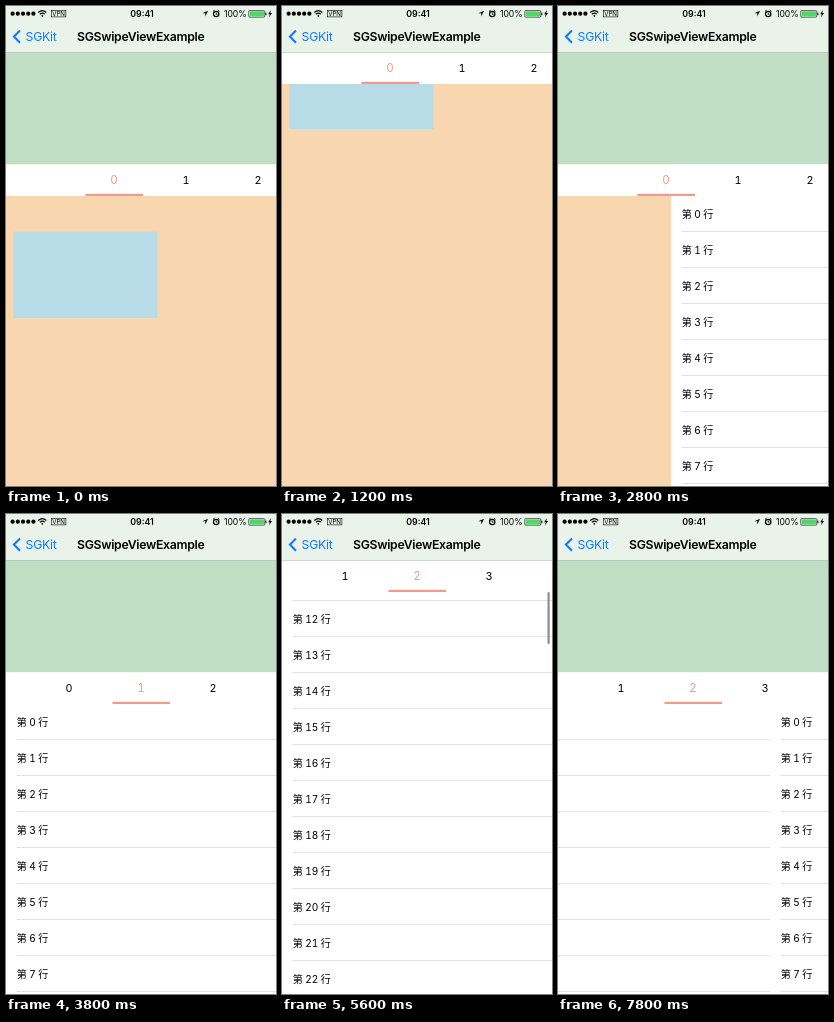
An HTML page that plays this animation: 270x480 px, repeating every 8 s.

```html
<!DOCTYPE html>
<html lang="zh">
<head>
<meta charset="utf-8">
<title>Swipe view</title>
<style>
  html, body { margin: 0; width: 100%; height: 100%; overflow: hidden; background: #fff; }
  svg { display: block; width: 100%; height: 100%; }
  text { font-family: Inter, "Noto Sans CJK SC", "Noto Sans CJK", sans-serif; }
  .row { font-size: 10.08px; letter-spacing: -.14px; font-variant-numeric: tabular-nums; }
  .tab { font-size: 10.8px; text-anchor: middle; font-variant-numeric: tabular-nums; }
  .tab.selected { font-size: 11.6px; fill: #f29b86; }
  .title { font-size: 12.24px; letter-spacing: -.29px; }
</style>
</head>
<body>
<svg viewBox="0 0 270 480" preserveAspectRatio="none">
  <g id="pages">
    <g id="page0">
      <rect width="270" height="480" fill="#f8d7b0"/>
      <rect id="box" x="7.5" width="144" height="86.4" fill="#b8dce7"/>
    </g>
  </g>
  <rect id="scroller" x="265.5" width="2.2" height="52" rx="1.1" fill="#8e8e8e"/>
  <g id="header">
    <rect y="46" width="270" height="112.4" fill="#c0dec3"/>
    <rect y="158.4" width="270" height="31.6" fill="#fff"/>
    <g id="tabs"><rect id="marker" x="-28.6" y="187.8" width="57.6" height="2.2" fill="#f29b8c"/></g>
  </g>

  <rect width="270" height="46" fill="#e9f3e9"/>
  <rect y="46" width="270" height=".6" fill="#b4c3b5"/>
  <path d="M14 24.5 8 30.6 14 36.7" fill="none" stroke="#1479fb" stroke-width="2.1"/>
  <text class="title" x="19.6" y="35" fill="#1479fb">SGKit</text>
  <text class="title" x="71" y="35" font-weight="600">SGSwipeViewExample</text>

  <g id="status">
    <g fill="none" stroke="#000" stroke-width="1.2">
      <path d="M32.3 6.5Q36.3 2.9 40.3 6.5M33.9 8.3Q36.3 6.1 38.7 8.3"/>
      <rect x="45.3" y="4.5" width="14.6" height="6.4" stroke-width=".6"/>
      <circle cx="210.2" cy="8" r="2.7"/>
      <path d="M207 5.4 208.6 4.2M211.8 4.2 213.4 5.4M210.2 6.5V8.2H211.5" stroke-width=".9"/>
      <rect x="242.8" y="4.6" width="16" height="6.6" rx="1" stroke-width=".6"/>
    </g>
    <circle cx="36.3" cy="9.8" r=".9"/>
    <text x="52.6" y="10" font-size="6.2" text-anchor="middle">VPN</text>
    <text x="136" y="10.8" font-size="8.8" font-weight="600" text-anchor="middle">09:41</text>
    <path d="M202 4.7 196.4 7.3H199.3V10.4Z"/>
    <text x="240.5" y="10.8" font-size="8.6" text-anchor="end" letter-spacing="-.1">100%</text>
    <rect x="243.6" y="5.4" width="14.4" height="5" fill="#4cd964"/>
    <rect x="259.4" y="6.6" width="1" height="2.6"/>
    <path d="M264.8 4 262.2 8.2H263.8L262.9 11.6 266 7.1H264.3Z"/>
  </g>
</svg>
<script>
const LOOP = 8000, STEP = 200;
const HEADER_TRAVEL = 112, LIST_TOP = 190, ROW_HEIGHT = 36, TAB_GAP = 72, WIDTH = 270;

const byId = id => document.getElementById(id);
function add(parent, tag, attrs, text = '') {
  const node = document.createElementNS('http://www.w3.org/2000/svg', tag);
  for (const key in attrs) node.setAttribute(key, attrs[key]);
  node.textContent = text;
  parent.append(node);
  return node;
}
const move = (node, x, y) => node.setAttribute('transform', `translate(${x} ${y})`);
const clamp = (v, lo, hi) => Math.min(hi, Math.max(lo, v));

// Value of a gesture sampled once per step; holds its ends.
const gesture = (start, values) => t =>
  values[clamp(Math.round((t - start) / STEP), 0, values.length - 1)];

const boxScroll = gesture(0, [0, 7, 38, 88, 140, 176, 189, 180, 108, 18, -29, -12, -2, 0]);
const listScroll = gesture(4800, [0, 15, 90, 285, 535, 640, 570, 310, 65, -23, -8, -1, 0]);
const swipes = [
  gesture(2400, [0, 28, 157, 255, 270]),
  gesture(4000, [0, 28, 160, 256, 270]),
  gesture(7200, [0, 5, 24, 58])
];
const tabShifts = [gesture(3000, [0, 24, 45]), gesture(4600, [0, 39, 72])];

const lists = [1, 2, 3].map(() => {
  const page = add(byId('pages'), 'g', {});
  add(page, 'rect', { width: WIDTH, height: 480, fill: '#fff' });
  const rows = add(page, 'g', {});
  for (let i = 0; i < 40; i++) {
    const y = i * ROW_HEIGHT;
    add(rows, 'text', { class: 'row', x: 10.8, y: y + 21.8 }, `第 ${i} 行`);
    add(rows, 'rect', { x: 10.8, y: y + 35, width: WIDTH - 10.8, height: .8, fill: '#dadadc' });
  }
  return { page, rows };
});
const tabs = [0, 1, 2, 3].map(i =>
  add(byId('tabs'), 'text', { class: 'tab', x: i * TAB_GAP, y: 178 }, i));
for (let i = 0; i < 5; i++) add(byId('status'), 'circle', { cx: 6.6 + i * 5.2, cy: 7.7, r: 2.1 });

function draw(time) {
  const t = Math.floor(time % LOOP / STEP) * STEP;
  const boxY = boxScroll(t), listY = listScroll(t);
  const swipe = swipes.reduce((sum, part) => sum + part(t), 0);
  const selected = t < 3200 ? 0 : t < 4800 ? 1 : 2;

  move(byId('page0'), -swipe, 0);
  byId('box').setAttribute('y', LIST_TOP + 35.6 - boxY);
  lists.forEach(({ page, rows }, i) => {
    move(page, (i + 1) * WIDTH - swipe, 0);
    move(rows, 0, LIST_TOP - (i === 1 ? listY : 0));
  });

  move(byId('header'), 0, -clamp(boxY + listY, 0, HEADER_TRAVEL));
  move(byId('tabs'), 108 - tabShifts.reduce((sum, part) => sum + part(t), 0), 0);
  move(byId('marker'), selected * TAB_GAP, 0);
  tabs.forEach((tab, i) => tab.classList.toggle('selected', i === selected));

  byId('scroller').setAttribute('y', 78 + (listY - 535) * .11);
  byId('scroller').setAttribute('opacity', listY > HEADER_TRAVEL ? 1 : 0);
}

const begin = performance.now();
function tick() {
  draw(performance.now() - begin);
  requestAnimationFrame(tick);
}
tick();
</script>
</body>
</html>
```
